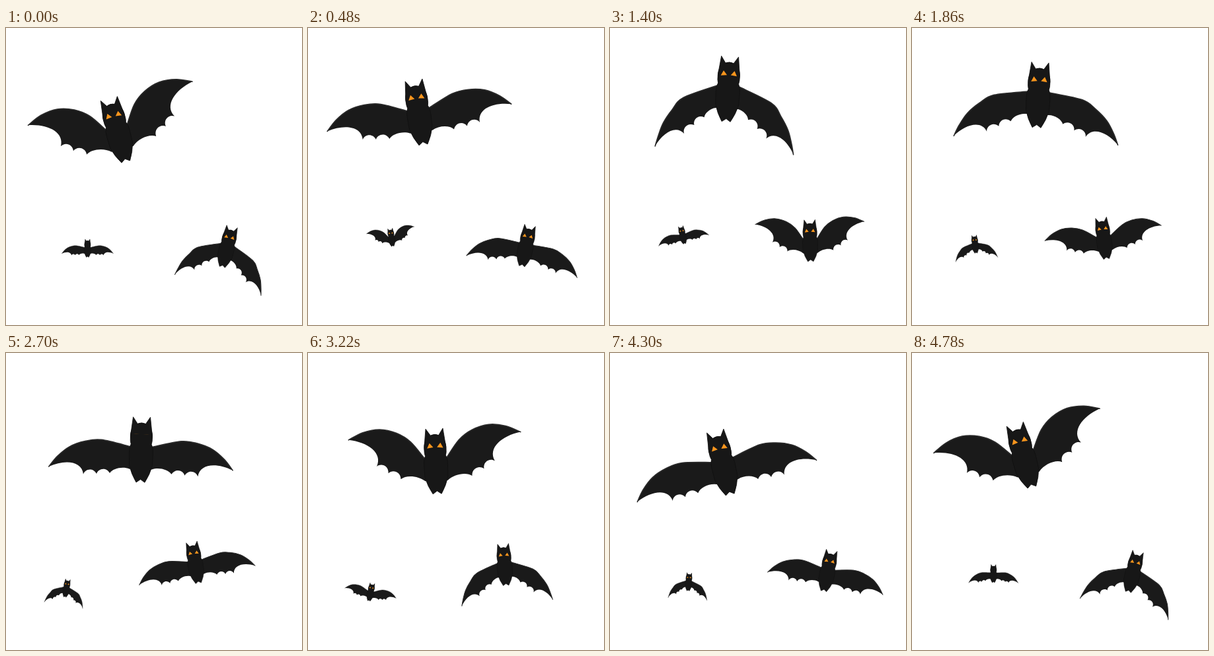
Recreate the animation shown at these times as an HTML page. Size 448 by 450 pixels, loop 4.8 s.

```html
<!DOCTYPE html>
<html lang="en">
<head>
<meta charset="utf-8">
<title>Bats</title>
<style>
  html, body { margin: 0; width: 100%; height: 100%; overflow: hidden; background: #fff; }
  svg { display: block; width: 100%; height: 100%; }
  .wing { fill: #1a1a1a; }
  .edge { fill: none; stroke: #2b2b2b; stroke-width: 1.6; stroke-linecap: round; }
  .body { fill: #171717; stroke: #111; stroke-width: .8; stroke-linejoin: round; }
  .eye { fill: #f8951d; }
</style>
</head>
<body>
<svg id="stage" viewBox="0 0 448 450"></svg>
<script>
const LOOP = 4800, FLAP = 400, TAU = Math.PI * 2;
const REST = 10, SWING = 36.5;        // wing angle in degrees
const PIVOT = 25.5;                   // shoulder joint, from the body axis

// Wing points around the joint: x, y, share of the flap they follow
const SHOULDER = [-9, -14];
const INNER = [-8.5, 20];
const RIDGE = [[35, -23, 1.2], [60, -20, 1.2], [83, -11, 1.15], [101, 4, 1.08], [113.5, 20, 1]];
const CUSPS = [[61, 30, .91], [41, 28.7, .83], [21, 27, .7]];

const BODY = 'M-16.5-30L-13-59L-6-48.5Q0-51.5 6-48.5L13-59L16.5-30Q17-22 15.5-18' +
  'Q18.5-12 18-4L17.5 14Q14 28 6.5 40L0 35.5L-6.5 40Q-14 28-17.5 14L-18-4' +
  'Q-18.5-12-15.5-18Q-17-22-16.5-30Z';
const EYES = 'M-12.2-29.5L-8.3-37.3L-2.8-30.7ZM12.2-29.5L8.3-37.3L2.8-30.7Z';

// Keys: time, x, y, tilt
const BIG = [
  [0, 171, 164, -14.9], [400, 169, 142, -10], [940, 168.5, 112.3, 1.9],
  [1400, 178, 102, 3.5], [1860, 190.7, 111, 3.2], [2280, 201, 131, 2.6],
  [2700, 204.3, 156, 1.2], [3220, 193.8, 173.5, -2.7], [3820, 175.8, 181.5, -3.7],
  [4000, 173.5, 179, -8.5], [4400, 172.5, 174, -14]
];
const SMALL = [
  [0, 123.4, 336.4, 0], [940, 124.6, 309.5, -14.4], [1860, 95.8, 330.2, -6.2],
  [2700, 91, 359, 9.6], [3220, 94.3, 364.8, 11.2], [3820, 111, 359.1, 6.9]
];

function sway(t) {
  const c = Math.cos(TAU * t / LOOP);
  return [309.3 + 24 * c, 330.2 + 7.2 * c, 1.6 + 12 * c];
}

// Closed smooth curve through the keys
function along(keys, t) {
  const n = keys.length;
  const key = i => {
    const k = keys[(i + n) % n];
    return [k[0] + LOOP * Math.floor(i / n), ...k.slice(1)];
  };
  let i = n - 1;
  while (keys[i][0] > t) i--;
  const [a, b, c, d] = [key(i - 1), key(i), key(i + 1), key(i + 2)];
  const h = c[0] - b[0], u = (t - b[0]) / h;
  const slope = (p, q, r, j) => {
    const l = q[0] - p[0], m = r[0] - q[0];
    return ((q[j] - p[j]) / l * m + (r[j] - q[j]) / m * l) / (l + m);
  };
  return [1, 2, 3].map(j => {
    const m0 = slope(a, b, c, j) * h, m1 = slope(b, c, d, j) * h;
    const e = c[j] - b[j];
    return b[j] + u * (m0 + u * (3 * e - 2 * m0 - m1 + u * (m0 + m1 - 2 * e)));
  });
}

const pt = p => p[0].toFixed(2) + ' ' + p[1].toFixed(2);
const curve = (a, b, c) => 'C' + [a, b, c].map(pt).join(' ');

function turn([x, y, share], deg, stretch) {
  const a = deg * share * Math.PI / 180, c = Math.cos(a), s = Math.sin(a);
  return [(x * c - y * s) * stretch, (x * s + y * c) * stretch];
}

function ridge(pts) {
  let d = 'M' + pt(pts[0]);
  for (let i = 0; i < pts.length - 1; i++) {
    const p = pts[i], q = pts[i + 1], o = pts[i - 1] || p, r = pts[i + 2] || q;
    d += curve(
      [p[0] + (q[0] - o[0]) / 6, p[1] + (q[1] - o[1]) / 6],
      [q[0] - (r[0] - p[0]) / 6, q[1] - (r[1] - p[1]) / 6], q);
  }
  return d;
}

// Hollow between two points of the rear edge
function hollow(a, b, f1, h1, f2, h2) {
  const x = b[0] - a[0], y = b[1] - a[1];
  const at = (f, h) => [a[0] + f * x - h * y, a[1] + f * y + h * x];
  return curve(at(f1, h1), at(f2, h2), b);
}

function wing(deg) {
  const top = [SHOULDER, ...RIDGE.map(p => turn(p, deg, 1))];
  const tip = top[top.length - 1];
  const [a, b, c] = CUSPS.map(p => turn(p, deg, 1 + .0016 * deg));
  const edge = ridge(top);
  const rear = hollow(tip, a, .4, .3, .88, .36) + hollow(a, b, .15, .4, .75, .5) +
    hollow(b, c, .15, .4, .75, .5) + hollow(c, INNER, .2, .2, .7, .2);
  return { edge, fill: edge + rear + 'L-22 20L-22-14Z' };
}

function make(tag, parent, attrs) {
  const el = document.createElementNS('http://www.w3.org/2000/svg', tag);
  for (const k in attrs) el.setAttribute(k, attrs[k]);
  return parent.appendChild(el);
}

function makeBat(size, phase, pose, blink) {
  const root = make('g', document.getElementById('stage'), {});
  const wings = [1, -1].map(side => {
    const g = make('g', root, { transform: `scale(${side} 1) translate(${PIVOT} 0)` });
    return { fill: make('path', g, { class: 'wing' }), edge: make('path', g, { class: 'edge' }) };
  });
  make('ellipse', root, { class: 'body', cx: 0, cy: -31, rx: 16.5, ry: 19 });
  make('path', root, { class: 'body', d: BODY });
  const eyes = make('path', root, { class: 'eye', d: EYES });

  return t => {
    const [x, y, tilt] = pose(t);
    root.setAttribute('transform',
      `translate(${x.toFixed(2)} ${y.toFixed(2)}) rotate(${tilt.toFixed(2)}) scale(${size})`);
    const shape = wing(-SWING * Math.cos(TAU * (t / FLAP - phase)));
    for (const w of wings) for (const k in w) w[k].setAttribute('d', shape[k]);
    let open = 1;
    if (blink !== null) {
      const gap = Math.abs(t - blink);
      open = Math.min(1, Math.max(0, (Math.min(gap, LOOP - gap) - 40) / 80));
    }
    eyes.setAttribute('transform', `translate(0 -33) scale(1 ${open}) translate(0 33)`);
  };
}

const bats = [
  makeBat(1, 0, t => along(BIG, t), 2700),
  makeBat(.64, .5, sway, null),
  makeBat(.28, .25, t => along(SMALL, t), 4790)
];

function draw(now) {
  const t = now % LOOP;
  for (const bat of bats) bat(t);
}

const start = performance.now();
function tick() {
  draw(performance.now() - start);
  requestAnimationFrame(tick);
}
tick();
</script>
</body>
</html>
```
